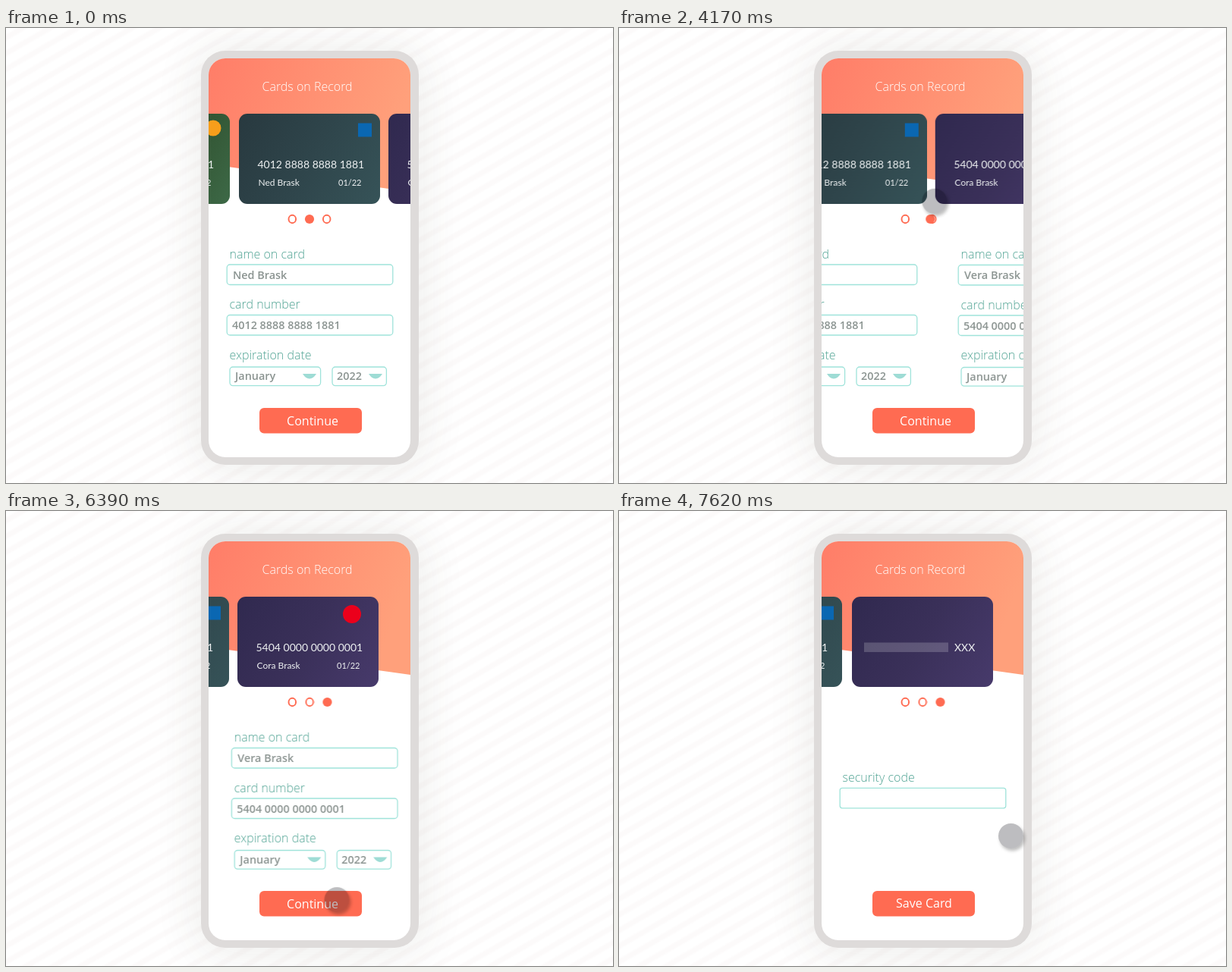
An HTML page that plays this animation: 800x600 px, repeating every 9000 ms.

```html
<!DOCTYPE html>
<html lang="en">
<head>
<meta charset="utf-8">
<title>Cards on Record</title>
<style>
html, body { margin: 0; width: 100%; height: 100%; overflow: hidden; background: #fff; }
#stage {
  position: absolute; left: 0; top: 0; width: 800px; height: 600px; overflow: hidden;
  background: repeating-linear-gradient(150deg, #fff 0 6px, #fcfafa 9px 13px, #fff 16px 18px);
}
#phone {
  position: absolute; left: 257px; top: 30px; width: 287px; height: 546px;
  border-radius: 32px; background: #dedbda;
  box-shadow: 0 2px 58px 6px rgba(70, 65, 45, .09);
}
#screen {
  position: absolute; left: 267px; top: 40px; width: 266px; height: 526px;
  border-radius: 22px; overflow: hidden; background: #fff;
}
.abs { position: absolute; left: -267px; top: -40px; width: 800px; height: 600px; }
svg { display: block; overflow: hidden; }
text { font: 16px "Open Sans", sans-serif; }

/* every moving part shares the 9 s clock */
.strip, .flip, .nudge, .sel, .ring, .first, .second, .code, .btn, .go, .save, #tap {
  animation: 9s ease-in-out infinite;
}

/* cards */
.card {
  position: absolute; top: 113px; width: 186px; height: 119px;
}
.face {
  position: absolute; left: 0; top: 0; width: 186px; height: 119px;
  border-radius: 11px; overflow: hidden;
}
.card text { font: 12px Lato, sans-serif; fill: #eef1f2; }
.card .num { font-size: 14px; }
.card .date { font-size: 11px; text-anchor: end; }
.green { background: linear-gradient(120deg, #27452c, #30512f 55%, #3d6947); }
.teal { background: linear-gradient(120deg, #28393f, #2f454b 50%, #365358); }
.purple { background: linear-gradient(120deg, #30294f, #3a3059 50%, #473a6b); }
.flipbox { perspective: 330px; }
.flip { position: absolute; left: 0; top: 0; width: 186px; height: 119px; transform-style: preserve-3d; animation-name: flip; }
.flip .face { backface-visibility: hidden; }
.flip .back { transform: rotateY(180deg); }
.strip { animation-name: strip; }
.nudge { animation-name: nudge; }

/* form */
.label { font-weight: 300; fill: #4fa393; }
.value { font-size: 14.4px; font-weight: 600; fill: #8b9491; }
.box { fill: #fff; stroke: #9fe3da; stroke-width: 1.3; }
.arrow { fill: #9edcd5; }
.first { animation-name: first; }
.second { animation-name: second; }
.code { animation-name: code; }

/* dots and button */
.ring { fill: #fff; stroke: #ff6b52; stroke-width: 1.9; }
.sel { fill: #ff6b52; animation-name: sel; }
.moving { animation-name: ring; }
.btn { fill: #ff6b52; animation-name: press; }
.go, .save { fill: #fff; text-anchor: middle; }
.go { animation-name: go; }
.save { animation-name: code; }

#tap {
  position: absolute; left: -16.5px; top: -16.5px; width: 33px; height: 33px; border-radius: 50%;
  background: rgba(0, 0, 12, .26); box-shadow: 2px 3px 4px rgba(0, 0, 0, .26);
  animation-name: tap, show; animation-timing-function: ease-in-out, step-end;
}

@keyframes show { 0% { opacity: 0 } 26.3%, 100% { opacity: 1 } }
@keyframes tap {
  0%, 26% { transform: translate(361px, -17.5px) }
  35.667%, 44.333% { transform: translate(474px, 226px) }
  48.667%, 62.333% { transform: translate(340px, 230px) }
  72%, 79.667% { transform: translate(437.5px, 518px) }
  84.667%, 100% { transform: translate(516px, 428px) }
}
@keyframes strip {
  0%, 44.333% { transform: none }
  48.667%, 100% { transform: translateX(-199px) }
}
@keyframes flip {
  0%, 79.667% { transform: translateX(0) rotateY(0) }
  84.667%, 100% { transform: translateX(2px) rotateY(180deg) }
}
@keyframes nudge {
  0%, 79.667% { transform: none }
  84.667%, 100% { transform: translateX(2px) }
}
@keyframes first {
  0%, 44.333% { transform: none }
  48.667%, 100% { transform: translateX(-267px) }
}
@keyframes second {
  0%, 44.333% { transform: translate(273px, .5px); opacity: 1 }
  48.667%, 79.667% { transform: translate(6.2px, .5px); opacity: 1 }
  84.667%, 100% { transform: translate(6.2px, .5px); opacity: 0 }
}
@keyframes code {
  0%, 79.667% { opacity: 0 }
  84.667%, 100% { opacity: 1 }
}
@keyframes sel {
  0%, 44.333% { transform: none }
  48.667%, 100% { transform: translateX(23.5px) }
}
@keyframes ring {
  0%, 44.333% { transform: none }
  48.667%, 100% { transform: translateX(-22.5px) }
}
@keyframes press {
  0%, 76.333% { fill: #ff6b52 }
  79.667% { fill: #ff5142 }
  84.667%, 100% { fill: #ff6b52 }
}
@keyframes go {
  0%, 76.333% { font-weight: 400; opacity: 1 }
  79.667% { font-weight: 300; opacity: .8 }
  84.667%, 100% { font-weight: 300; opacity: 0 }
}
</style>
</head>
<body>
<div id="stage">
  <div id="phone"></div>
  <div id="screen">
    <svg class="abs" viewBox="0 0 800 600">
      <defs>
        <linearGradient id="coral" x1="0" y1="0" x2="1" y2=".25">
          <stop offset="0" stop-color="#ff7d68"/>
          <stop offset="1" stop-color="#ffa07b"/>
        </linearGradient>
        <g id="fields">
          <text class="label" x="294.5" y="303.5">name on card</text>
          <rect class="box" x="291.2" y="312" width="218.6" height="26.5" rx="4"/>
          <text class="label" x="294.5" y="370">card number</text>
          <rect class="box" x="291.2" y="378.5" width="218.6" height="26.5" rx="4"/>
          <text class="label" x="294.5" y="436.5">expiration date</text>
          <rect class="box" x="295" y="447" width="119.6" height="24.6" rx="4"/>
          <rect class="box" x="430" y="447" width="71.4" height="24.6" rx="4"/>
          <text class="value" x="302" y="464">January</text>
          <text class="value" x="436" y="464">2022</text>
          <path id="arrow" class="arrow" d="M391 456H409Q405 462.5 400 462.5Q395 462.5 391 456Z"/>
          <use href="#arrow" x="87"/>
        </g>
      </defs>
      <path fill="url(#coral)" d="M267 40H533V216L267 179.500Z"/>
      <text x="337.500" y="82.500" font-weight="300" style="font-weight:300" fill="#fff">Cards on Record</text>

      <ellipse class="ring" cx="377.3" cy="252" rx="4.8" ry="5.2"/>
      <ellipse class="ring moving" cx="422.7" cy="252" rx="4.8" ry="5.2"/>
      <circle class="sel" cx="400" cy="252" r="6.1"/>

      <g class="first">
        <use href="#fields"/>
        <text class="value" x="299" y="330.500">Ned Brask</text>
        <text class="value" x="298" y="397">4012 8888 8888 1881</text>
      </g>
      <g class="second">
        <use href="#fields"/>
        <text class="value" x="299" y="330.500">Vera Brask</text>
        <text class="value" x="298" y="397">5404 0000 0000 0001</text>
      </g>
      <g class="code">
        <text class="label" x="294.500" y="357">security code</text>
        <rect class="box" x="291.200" y="365.300" width="218.600" height="26.500" rx="3"/>
      </g>

      <rect class="btn" x="334" y="501" width="135" height="33.500" rx="6"/>
      <text class="go" x="404" y="523.500">Continue</text>
      <text class="save" x="402" y="523">Save Card</text>
    </svg>

    <div class="abs strip">
      <div class="card" style="left:108.5px">
        <svg class="face green">
          <circle cx="164" cy="19" r="10.500" fill="#f79e1b"/>
          <text class="num" x="24.500" y="72">4012 8888 8888 1881</text>
          <text class="date" x="161.500" y="94.500">01/22</text>
        </svg>
      </div>
      <div class="card" style="left:306.5px">
        <svg class="face teal">
          <rect x="157" y="12.500" width="18" height="18" fill="#0a67b2"/>
          <g class="nudge">
            <text class="num" x="24.500" y="72">4012 8888 8888 1881</text>
            <text x="25.500" y="94.500">Ned Brask</text>
            <text class="date" x="161.500" y="94.500">01/22</text>
          </g>
        </svg>
      </div>
      <div class="card flipbox" style="left:503.5px">
        <div class="flip">
          <svg class="face purple">
            <circle cx="151" cy="23" r="12" fill="#eb001b"/>
            <text class="num" x="24.500" y="72">5404 0000 0000 0001</text>
            <text x="25.500" y="94.500">Cora Brask</text>
            <text class="date" x="161.500" y="94.500">01/22</text>
          </svg>
          <svg class="face back purple">
            <rect x="16" y="60.500" width="111" height="12.500" fill="#fff" opacity=".19"/>
            <text class="num" x="135" y="72">XXX</text>
          </svg>
        </div>
      </div>
    </div>
  </div>
  <div id="tap"></div>
</div>
</body>
</html>
```
